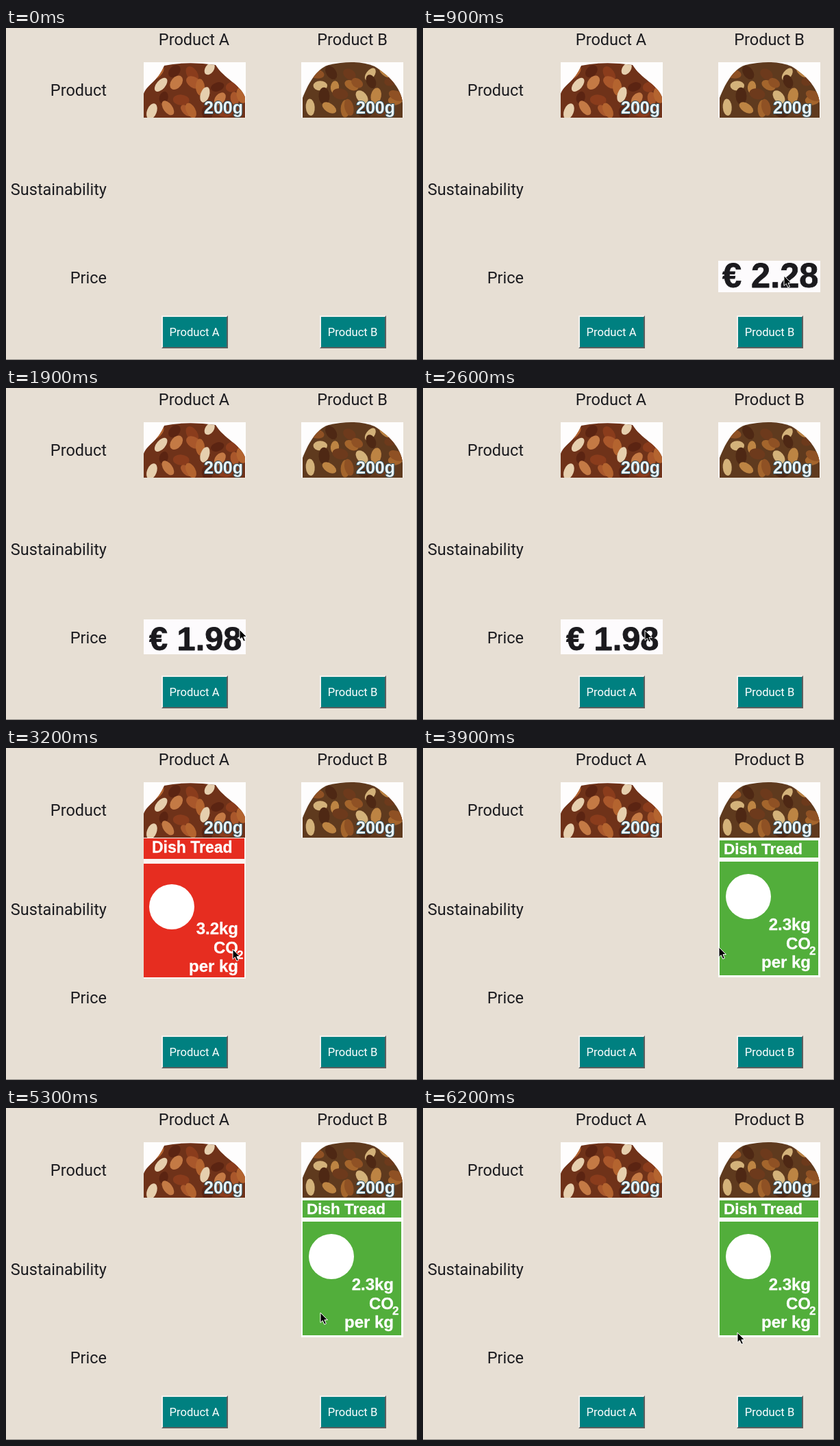
Recreate the animation shown at these times as an HTML page. Size 600x485 px, loop 6.3 s.

```html
<!DOCTYPE html>
<html lang="en">
<head>
<meta charset="utf-8">
<title>Product choice</title>
<style>
  html, body { margin: 0; width: 100%; height: 100%; overflow: hidden; background: #e7dfd4; }
  svg { display: block; width: 600px; height: 485px; }
  .ui { font-family: Roboto, sans-serif; font-size: 23.5px; fill: #1c1c20; }
  .end { text-anchor: end; }
  .mid { text-anchor: middle; }
  .btn { font-size: 16.6px; fill: #fff; }
  .bold { font-family: "Liberation Sans", Arial, sans-serif; font-weight: 700; stroke-linejoin: round; }
  .price { fill: #1b1a1e; stroke: #1b1a1e; stroke-width: .8; }
  .label { font-size: 24px; fill: #fff; stroke: #fff; stroke-width: .3; }
  .weight { font-size: 25px; fill: #e9f6fa; stroke: #37525c; stroke-width: 2; paint-order: stroke; }
</style>
</head>
<body>
<svg viewBox="0 0 600 485" id="stage"></svg>
<script>
const LOOP = 6300, STEP = 100;

const text = (x, y, cls, str, extra = "") =>
  `<text x="${x}" y="${y}" class="${cls}" ${extra}>${str}</text>`;
const rect = (x, y, w, h, fill) =>
  `<rect x="${x}" y="${y}" width="${w}" height="${h}" fill="${fill}"/>`;

function seeded(seed) {
  return () => (seed = (seed * 16807) % 2147483647) / 2147483647;
}

// A white photo card with a heap of flat nut shapes.
function nuts(id, x, heap, base, tones, seed, weightX) {
  const rnd = seeded(seed);
  let shapes = "";
  for (let i = 0; i < 24; i++) {
    const cx = x + 10 + (i * 61 % 149) * 0.9 + rnd() * 6;
    const cy = 58 + Math.floor(i / 6) * 19 + rnd() * 10;
    shapes += `<ellipse rx="${(9 + rnd() * 4).toFixed(1)}" ry="${(6 + rnd() * 2).toFixed(1)}" fill="${tones[i % tones.length]}"
      transform="translate(${cx.toFixed(1)} ${cy.toFixed(1)}) rotate(${Math.round(rnd() * 180)})"/>`;
  }
  return `<clipPath id="${id}"><path d="${heap}"/></clipPath>` +
    rect(x, 50, 149, 81, "#fefdfd") +
    `<path d="${heap}" fill="${base}"/><g clip-path="url(#${id})">${shapes}</g>` +
    text(weightX, 125, "bold weight", "200g");
}

function button(x, name) {
  return rect(x, 420, 97, 48, "#5b5f5f") +
    `<path d="M${x} 468V420H${x + 97}L${x + 95} 422H${x + 2}V466Z" fill="#f3f1ee"/>` +
    rect(x + 2, 422, 93, 44, "#008080") +
    text(x + 48, 450, "ui btn mid", name);
}

function amount(right, y, value) {
  return text(right, y, "bold label end", value) +
    text(right, y + 27.5, "bold label end", "CO") +
    text(right - 2, y + 35.5, "bold label", "2", 'style="font-size:17px"') +
    text(right, y + 55, "bold label end", "per kg");
}

const panels = [
  { box: [201, 338, 149, 51],
    art: rect(201, 338, 149, 51, "#fdfbfd") +
      text(209, 383, "bold price", "€ 1.98", 'font-size="48.7"') },
  { box: [431, 340, 149, 46],
    art: rect(431, 340, 149, 46, "#fdfbfd") +
      text(437, 379, "bold price", "€ 2.28", 'font-size="50.5"') },
  { box: [201, 131, 149, 206],
    art: rect(201, 131, 149, 206, "#fbf5f2") +
      rect(201, 132, 147, 30, "#e62d20") + rect(201, 169, 147, 166, "#e62d20") +
      text(213, 153, "bold label", "Dish Tread", 'style="font-size:23px"') +
      `<circle cx="242" cy="232" r="33" fill="#fff"/>` + amount(339, 272, "3.2kg") },
  { box: [431, 131, 149, 204],
    art: rect(431, 131, 149, 204, "#fbfdf9") +
      rect(433, 135, 144, 25, "#52ae3b") + rect(433, 166, 144, 166, "#52ae3b") +
      text(439, 155, "bold label", "Dish Tread", 'style="font-size:22.5px"') +
      `<circle cx="475" cy="217" r="33" fill="#fff"/>` + amount(566, 266, "2.3kg") }
];

const stage = document.getElementById("stage");
stage.innerHTML =
  rect(0, 0, 600, 485, "#e7dfd4") +
  rect(599, 0, 1, 485, "#a29d96") + rect(0, 484, 600, 1, "#8b8782") +
  text(274.5, 25, "ui mid", "Product A") + text(505.5, 25, "ui mid", "Product B") +
  text(147, 99, "ui end", "Product") +
  text(147, 244, "ui end", "Sustainability") +
  text(147, 373, "ui end", "Price") +
  nuts("heapA", 201,
    "M201 131V96C206 82 222 78 231 55Q265 48 306 54C318 74 342 82 349 101V131Z",
    "#6f3219", ["#a9572b", "#8a3c1c", "#c47a45", "#5b2412", "#e6cfae", "#b4642f"], 41, 289) +
  nuts("heapB", 431,
    "M433 131V102C440 84 452 60 471 54Q510 45 538 56C557 68 577 86 579 110V131Z",
    "#5f3a1e", ["#a4652c", "#6d3a1c", "#bd8443", "#4e2814", "#d3b27a", "#8f5124"], 977, 511) +
  button(227, "Product A") + button(458, "Product B") +
  panels.map(p => `<g class="panel" visibility="hidden">${p.art}</g>`).join("") +
  `<path id="cursor" d="M0 0V14.5L3.3 11.5L5.8 17.2L8.4 16L5.9 10.6H10.4Z"
    fill="#000" stroke="#fff" stroke-width="1" stroke-linejoin="round"/>`;

const groups = stage.querySelectorAll(".panel");
const cursor = document.getElementById("cursor");

// time, x, y
const path = [
  [100, 573, 330], [500, 540, 360], [900, 527, 362], [1300, 523, 363],
  [1900, 341, 353], [2200, 322, 358], [2600, 324, 354], [3200, 331, 294],
  [3400, 338, 292], [3900, 432, 291], [4300, 462, 293], [5300, 459, 299],
  [6200, 459, 328]
];

function pointer(t) {
  const i = Math.min(path.findIndex((k, n) => !path[n + 1] || t < path[n + 1][0]), path.length - 2);
  const [t0, x0, y0] = path[i], [t1, x1, y1] = path[i + 1];
  const p = (t - t0) / (t1 - t0), e = p * p * (3 - 2 * p);
  return [x0 + (x1 - x0) * e, y0 + (y1 - y0) * e];
}

function draw(now) {
  const t = Math.floor((now % LOOP) / STEP) * STEP;
  const shown = t >= path[0][0];
  const [x, y] = shown ? pointer(t) : [-99, -99];
  cursor.setAttribute("transform", `translate(${x.toFixed(1)} ${y.toFixed(1)})`);
  panels.forEach(({ box: [bx, by, w, h] }, i) => {
    const over = x >= bx && x < bx + w && y >= by && y < by + h;
    groups[i].setAttribute("visibility", over ? "visible" : "hidden");
  });
}

const start = performance.now();
function tick() {
  draw(performance.now() - start);
  requestAnimationFrame(tick);
}
tick();
</script>
</body>
</html>
```
